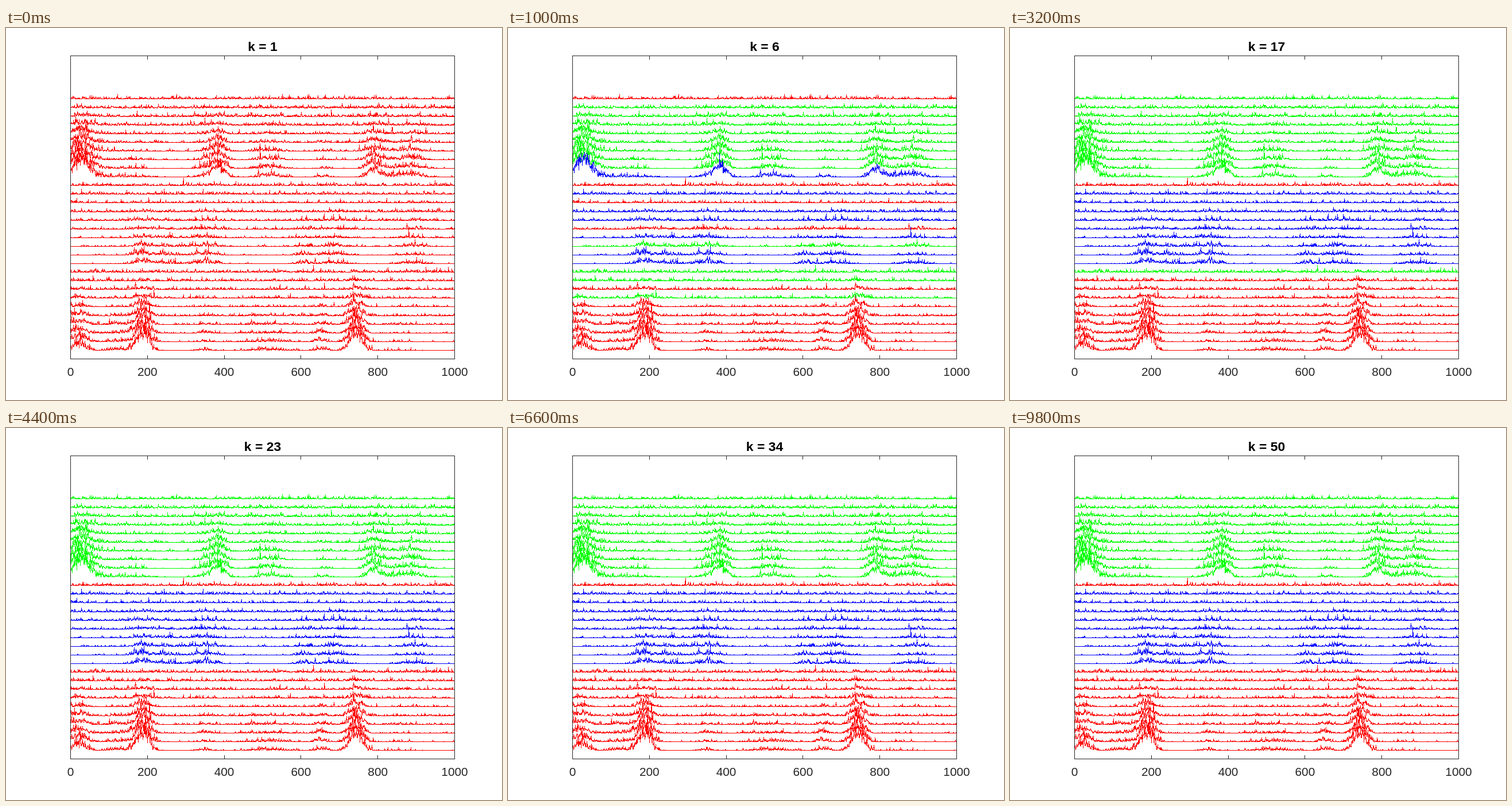
Recreate the animation shown at these times as an HTML page. Size 864x648 px, loop 10000 ms.

```html
<!DOCTYPE html>
<html lang="en">
<head>
<meta charset="utf-8">
<title>Trace clustering</title>
<style>
  html, body { margin: 0; width: 100%; height: 100%; overflow: hidden; background: #fff; }
  svg { display: block; width: 864px; height: 648px; }
  path { shape-rendering: crispEdges; }
  text { font-family: "Liberation Sans", Arial, sans-serif; text-anchor: middle; }
  .label { font-size: 20.83px; fill: #262626; }
  .frame { fill: none; stroke: #262626; }
  #title { font-size: 22.92px; font-weight: bold; }
</style>
</head>
<body>
<svg viewBox="0 0 864 648">
  <g id="traces"></g>
  <g id="axes"></g>
  <text id="title" x="447" y="40"></text>
</svg>
<script>
const LEFT = 112.5, RIGHT = 781.5, TOP = 48.5, BOTTOM = 576.5;
const X_STEP = (RIGHT - LEFT) / 1000, ROW_STEP = (BOTTOM - TOP) / 35;
const STEP_MS = 200, STEPS = 50;
const COLORS = { R: '#f00', G: '#0f0', B: '#00f' };
const traces = document.getElementById('traces');
const axes = document.getElementById('axes');
const title = document.getElementById('title');

// Bumps of each group, top to bottom: [centre, height, spread]
const GROUPS = [
  [[24, 27, 20], [50, 6, 28], [160, 2, 30], [362, 6, 20], [387, 17, 14],
   [515, 6, 25], [660, 2, 13], [788, 14, 15], [820, 3, 30], [885, 7, 24]],
  [[185, 4.5, 18], [225, 3, 40], [350, 4.5, 25], [610, 2.5, 18], [685, 3.5, 26], [890, 3, 26]],
  [[22, 13, 18], [130, 3, 22], [187, 33, 16], [350, 2.2, 14], [515, 2.4, 35],
   [652, 5, 13], [743, 32, 16], [850, 0.6, 18]]
];
const SPIKES = { '7:494': 21, '6:494': 13, '16:881': 19 };

// Cluster of every row, top to bottom, at known steps
const STATES = [
  [1, 'R'.repeat(30)],
  [2, 'RGGRBGRRGB' + 'RBRRGRBGBB' + 'BGRGBGRRRR'],
  [6, 'RGGGGGGGGB' + 'RBRBBRBGBB' + 'GGRGRRRRRR'],
  [17, 'G'.repeat(10) + 'R' + 'B'.repeat(9) + 'G' + 'R'.repeat(9)],
  [23, 'G'.repeat(10) + 'R' + 'B'.repeat(9) + 'R'.repeat(10)]
];

let seed = 20241;
function random() {
  seed = (Math.imul(seed, 1664525) + 1013904223) >>> 0;
  return (seed + 0.5) / 4294967296;
}
const exponential = () => -Math.log(random());

// Non-negative noise whose variance grows with its mean
function noisy(mean, grain = 0.9) {
  let sum = 0;
  for (let t = exponential(); t < mean / grain; t += exponential()) sum += grain * exponential();
  return sum;
}

function addElement(parent, tag, attributes) {
  const element = document.createElementNS('http://www.w3.org/2000/svg', tag);
  for (const name in attributes) element.setAttribute(name, attributes[name]);
  parent.append(element);
  return element;
}

// One pixel wide vertical run between two pixel rows
function column(x, a, b) {
  const top = Math.min(a, b), bottom = Math.max(a, b) + 1;
  return `M${x} ${top}h1V${bottom}h-1Z`;
}

function tracePath(row) {
  const level = (9 - row % 10) / 9;
  const signal = (1 - level) ** 1.6;
  const background = 0.05 + 1.3 * level ** 1.4;
  const base = BOTTOM - ROW_STEP * (30 - row);
  let path = '', lastX, lastY;
  for (let n = 1; n <= 1000; n++) {
    const shape = GROUPS[Math.floor(row / 10)].reduce((sum, [centre, height, spread]) =>
      sum + height * Math.exp(-(((n - centre) / spread) ** 2) / 2), 0);
    const value = SPIKES[row + ':' + n] || noisy(shape * signal + background);
    const x = Math.floor(LEFT + n * X_STEP), y = Math.floor(base - value);
    if (n > 1) {
      const middle = x === lastX ? y : Math.round((lastY + y) / 2);
      path += column(lastX, lastY, middle) + column(x, middle, y);
    }
    lastX = x;
    lastY = y;
  }
  return path;
}

const rows = Array.from({ length: 30 }, (_, row) => addElement(traces, 'path', { d: tracePath(row) }));

let frame = `M${LEFT} ${TOP}H${RIGHT}V${BOTTOM}H${LEFT}Z`;
for (let value = 0; value <= 1000; value += 200) {
  const x = LEFT + value * X_STEP;
  if (value % 1000) {
    const tickX = Math.floor(x) + 0.5;
    frame += `M${tickX} ${TOP}v6.5M${tickX} ${BOTTOM}v-6.5`;
  }
  addElement(axes, 'text', { x, y: 606, class: 'label' }).textContent = value;
}
addElement(axes, 'path', { d: frame, class: 'frame' });

// Rows change cluster one after another between two known steps
function clusterOf(row, k) {
  const next = STATES.findIndex(([step]) => step >= k);
  if (next < 0) return STATES.at(-1)[1][row];
  if (next === 0) return STATES[0][1][row];
  const [start, before] = STATES[next - 1], [end, after] = STATES[next];
  const change = start + 1 + (row * 7) % (end - start);
  return (k >= change ? after : before)[row];
}

function draw(k) {
  title.textContent = 'k = ' + k;
  const clusters = rows.map((_, row) => clusterOf(row, k));
  for (const cluster of 'RGB') {
    rows.forEach((path, row) => {
      if (clusters[row] !== cluster) return;
      path.setAttribute('fill', COLORS[cluster]);
      traces.append(path);
    });
  }
}

const startTime = performance.now();
let shown = 0;
function tick() {
  const k = Math.floor((performance.now() - startTime) / STEP_MS) % STEPS + 1;
  if (k !== shown) draw(shown = k);
  requestAnimationFrame(tick);
}
tick();
</script>
</body>
</html>
```
